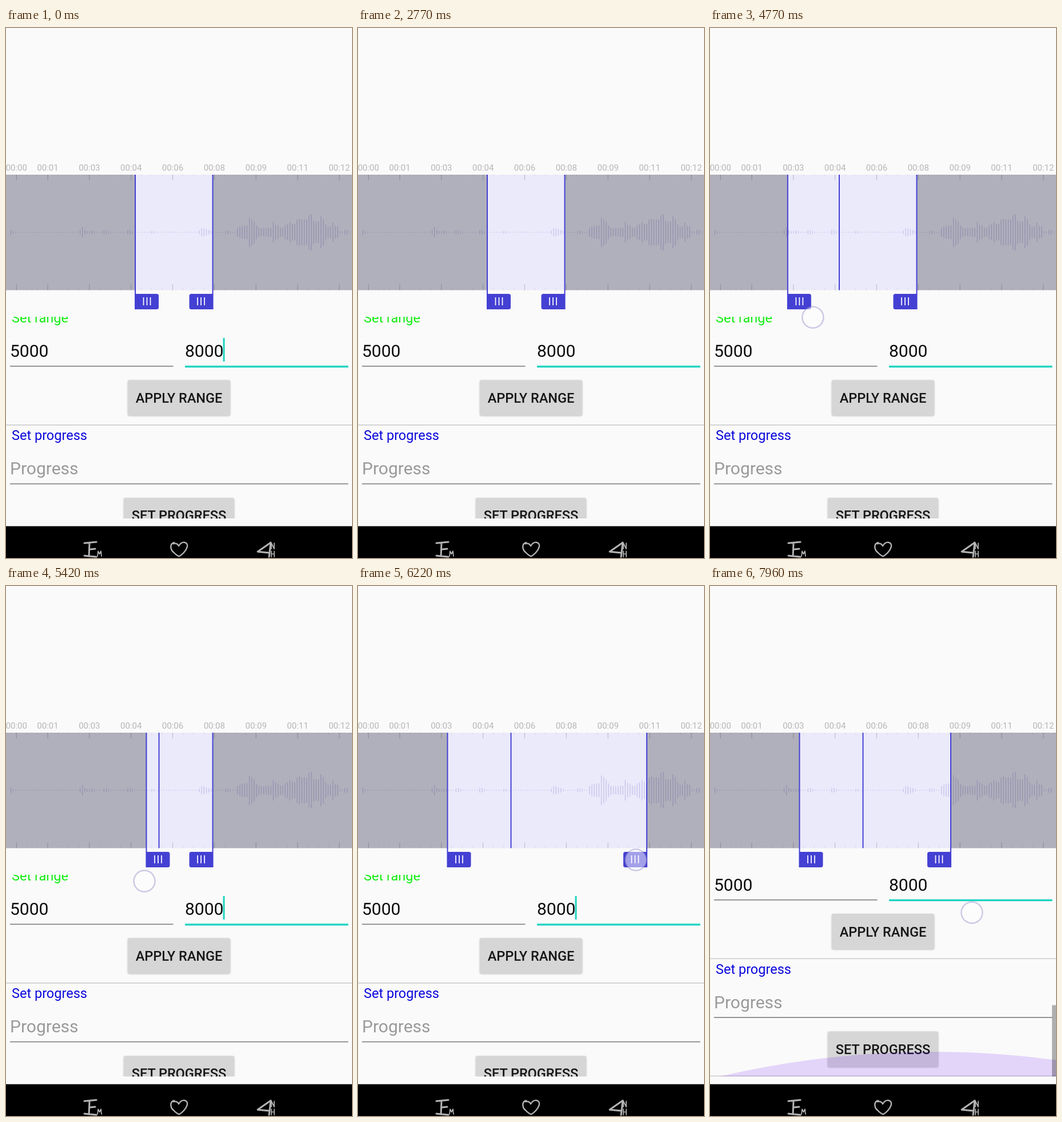
Animation, 605 px wide and 925 px high, one loop 7.99 s. Source, as an HTML page:

```html
<!DOCTYPE html>
<html lang="en">
<head>
<meta charset="utf-8">
<title>Audio range picker</title>
<style>
html, body { margin: 0; width: 605px; height: 925px; overflow: hidden; background: #fafafa; }
svg { display: block; font-family: Roboto, sans-serif; }
.time { font-size: 15px; fill: #b6b6b6; text-anchor: middle; }
.field { font-size: 30px; fill: #0c0c0c; }
.label { font-size: 23.5px; }
.button { font-size: 23.5px; font-weight: 500; fill: #161616; text-anchor: middle; }
.face { fill: #d6d6d6; filter: drop-shadow(0 1.5px 1.5px rgba(0,0,0,.25)); }
.line { fill: #848484; }
.nav { fill: none; stroke: #b4b4b4; stroke-linecap: round; stroke-linejoin: round; }
</style>
</head>
<body>
<svg width="605" height="925" viewBox="0 0 605 925">
  <defs>
    <clipPath id="view"><rect y="504" width="605" height="352"/></clipPath>
    <g id="handle">
      <path fill="#4440d3" d="M-1 256h2v208h36.500a3.500 3.500 0 0 1 3.500 3.500v20a3.500 3.500 0 0 1-3.500 3.500H-1z"/>
      <path stroke="#fff" stroke-width="1.700" d="M14.500 470v14M20.500 470v14M26.500 470v14"/>
    </g>
  </defs>
  <rect width="605" height="925" fill="#fafafa"/>
  <g id="times" class="time"></g>
  <rect y="256" width="605" height="201.500" fill="#ebeafb"/>
  <path id="minor" stroke="#d9d7e8"/>
  <path id="major" stroke="#c4c2d2" stroke-width="1.300"/>
  <path id="wave" stroke="#c5c2ea" stroke-width="1.300"/>
  <rect id="maskL" y="256" height="201.500" fill-opacity=".25"/>
  <rect id="maskR" y="256" height="201.500" fill-opacity=".25"/>
  <rect id="progress" y="256" width="2" height="201.500" fill="#4440d3"/>
  <use id="left" href="#handle"/>
  <use id="right" href="#handle"/>

  <g clip-path="url(#view)">
    <g id="content">
      <text class="label" x="10" y="514" fill="#0f0f0f" style="fill:#12ee12">Set range</text>
      <text class="field" x="7" y="574">5000</text>
      <text class="field" x="313" y="574">8000</text>
      <rect class="line" x="7" y="589.500" width="285.500" height="1.700"/>
      <rect x="313" y="589.300" width="285.500" height="3.300" fill="#1dd3c2"/>
      <rect id="cursor" x="379.500" y="541" width="3" height="41" fill="#1dd3c2"/>
      <rect class="face" x="213" y="614.500" width="179" height="61.500" rx="3"/>
      <text class="button" x="302.500" y="654">APPLY RANGE</text>
      <rect y="692" width="605" height="1.700" fill="#cfcfcf"/>
      <text class="label" x="10" y="719" fill="#0b08dc">Set progress</text>
      <text class="field" x="7" y="779" style="fill:#9a9a9a">Progress</text>
      <rect class="line" x="7" y="794.700" width="591.500" height="1.700"/>
      <rect class="face" x="206" y="820" width="193" height="61.500" rx="3"/>
      <text class="button" x="302.500" y="859">SET PROGRESS</text>
      <rect y="897" width="605" height="1.700" fill="#cfcfcf"/>
    </g>
    <path id="glow" fill="#6200ee"/>
    <rect id="bar" x="598" width="7" height="124.500" fill="#000" fill-opacity=".3"/>
  </g>

  <rect y="869.500" width="605" height="56" fill="#000"/>
  <g class="nav" stroke-width="3">
    <path d="M137 899L158 897M146 899L145 922M146 910L156 909M137 921L158 923"/>
    <path stroke-width="1.700" d="M160 922L161 913L163.500 918L166 913L167 922"/>
    <path stroke-width="2.400" d="M294 898C286 900 287 910 293 915C297 919 300 922 303 922C307 920 315 913 317 905C318 897 308 894 302 904C300 900 297 899 293 900"/>
    <path d="M463 898L440 914L461 916M463 898L460 923"/>
    <path stroke-width="1.700" d="M464 909V899L469 909V899M464 913V923M469 913V923M464 918H469"/>
  </g>
  <circle id="touch" r="18.500" fill="#fff" fill-opacity=".5" stroke="#8580c4" stroke-opacity=".4" stroke-width="2.500"/>
</svg>
<script>
const LOOP = 7990;
const $ = id => document.getElementById(id);
const set = (id, attrs) => { for (const k in attrs) $(id).setAttribute(k, attrs[k]); };
const clamp = (v, lo, hi) => Math.min(hi, Math.max(lo, v));

// Eased value along a list of [time, value] keys
function ease(keys, t) {
  const i = keys.findIndex(k => k[0] > t);
  if (i < 0) return keys[keys.length - 1][1];
  if (i === 0) return keys[0][1];
  const [t0, a] = keys[i - 1], [t1, b] = keys[i];
  const u = (t - t0) / (t1 - t0);
  return a + (b - a) * u * u * (3 - 2 * u);
}

// Time scale
const labels = ['00:00', '00:01', '00:03', '00:04', '00:06', '00:08', '00:09', '00:11', '00:12'];
const labelX = i => i ? 73 + 72.83 * (i - 1) : 18.3;
$('times').innerHTML = labels.map((s, i) => `<text x="${labelX(i)}" y="249">${s}</text>`).join('');
const tick = (x, h) => `M${x} 256v${h}M${x} 457.5v${-h}`;
set('major', { d: labels.map((_, i) => tick(labelX(i), 10)).join('') });
set('minor', { d: Array.from({ length: 33 }, (_, i) => tick(18.2 * (i + 1), 4)).join('') });

// Half heights of the bars: start index of each burst, then its values
const bursts = {
  0: [5, 2], 29: [4, 9, 4, 2, 2, 3, 2], 39: [3, 4, 2], 49: [4, 4, 2], 59: [2, 2],
  79: [3, 7, 7, 5, 4, 2], 90: [3, 3, 2],
  95: [7, 10, 11, 12, 12, 26, 23, 19, 12, 8, 7, 7, 7, 8, 8, 18, 13, 11, 8, 8, 12, 14, 18, 15, 14,
    22, 24, 22, 23, 22, 30, 32, 20, 18, 19, 28, 23, 14, 10, 10, 17, 11, 10, 2, 1, 4, 4]
};
const heights = Array(143).fill(0.8);
for (const at in bursts) bursts[at].forEach((h, i) => heights[+at + i] = h);
set('wave', { d: heights.map((h, i) => `M${8.6 + 4.17 * i} ${356.500 - h}v${2 * h}`).join('') });

const blinks = [330, 830, 1340, 1940, 2310, 2840, 3310, 3820, 4320, 4870, 5460, 5900, 6400, 6880, 7380];
const startKeys = [[4180, 226], [4490, 32], [5100, 267.5], [5330, 267.5], [5648, 156.5]];
const endKeys = [[5840, 361.5], [6250, 507], [6480, 421]];
const LAG = 45;

function touchAt(t) {
  if (t >= 4140 && t < 5760)
    return [ease(startKeys, t + LAG) + 18, ease([[4140, 486], [4770, 505], [5420, 515]], t), clamp((5760 - t) / 110, 0, 1)];
  if (t >= 5760 && t < 6740)
    return [ease(endKeys, t + LAG) - 20, ease([[6220, 478], [6480, 490]], t), clamp((6740 - t) / 200, 0, 1)];
  if (t >= 7330) return [458, swipeY(t), 1];
  return [0, 0, 0];
}
const swipeY = t => ease([[7330, 690], [7960, 570]], t);

function draw(t) {
  const start = ease(startKeys, t), end = ease(endKeys, t);
  const head = t < 4490 ? 226 : t < 5100 ? Math.max(226, start) : 267.5;
  set('maskL', { width: start });
  set('maskR', { x: end, width: 605 - end });
  set('left', { transform: `translate(${start})` });
  set('right', { transform: `translate(${end}) scale(-1 1)` });
  set('progress', { x: head - 1 });
  set('cursor', { opacity: blinks.filter(b => b <= t).length % 2 ? 0 : 1 });

  // Swipe up: touch slop, then scroll, then the edge glow
  const pull = Math.max(0, 690 - swipeY(t) - 14);
  const scroll = Math.min(pull, 42.5);
  const over = (pull - scroll) / 63.5;
  const h = 43 * over;
  set('content', { transform: `translate(0 ${-scroll})` });
  set('bar', { y: 716.5 + 15 * scroll / 42.5, opacity: scroll > 0 ? 1 : 0 });
  const r = h > 0 ? (373 * 373 + h * h) / (2 * h) : 0;
  set('glow', { d: h > 0 ? `M17 856A${r} ${r} 0 0 1 763 856z` : '', opacity: 0.15 * over });

  const [x, y, alpha] = touchAt(t);
  set('touch', { cx: x, cy: y, opacity: alpha });
}

function loop() {
  draw(performance.now() % LOOP);
  requestAnimationFrame(loop);
}
loop();
</script>
</body>
</html>
```
